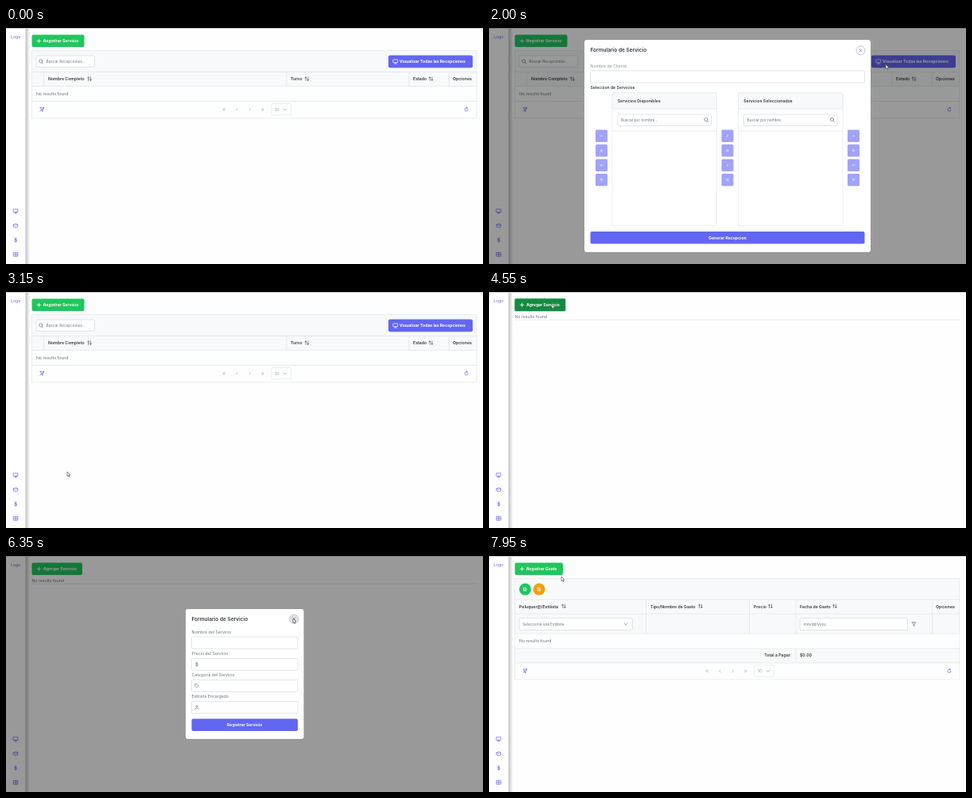
These frames come from a looping animation (600x298 px, 8 s). An HTML page:

```html
<!DOCTYPE html>
<html lang="es">
<head>
<meta charset="utf-8">
<style>
html, body { margin: 0; width: 100%; height: 100%; overflow: hidden; background: #fff; }
svg { display: block; width: 100%; height: 100%; font: 5.2px Inter, "Open Sans", sans-serif; }
</style>
</head>
<body>
<svg id="stage" viewBox="0 0 600 298"></svg>
<script>
const INDIGO = '#6366f1', GREEN = '#22c55e', GRAY = '#6c757d', DARK = '#343a40', LINE = '#e3e7eb', PALE = '#f8f9fa';

// Drawing helpers
const rect = (x, y, x2, y2, fill, stroke = 'none', r = 0, extra = '') =>
  `<rect x="${x}" y="${y}" width="${x2 - x}" height="${y2 - y}" rx="${r}" fill="${fill}" stroke="${stroke}" stroke-width=".7" ${extra}/>`;
const text = (x, y, s, fill = GRAY, weight = 400, size = 5.2, anchor = 'start') =>
  `<text x="${x}" y="${y}" fill="${fill}" font-weight="${weight}" font-size="${size}" text-anchor="${anchor}">${s}</text>`;
const bold = (x, y, s, size = 5.2) => text(x, y, s, DARK, 600, size);
const icon = (x, y, d, color = GRAY, w = .7) =>
  `<path transform="translate(${x} ${y})" d="${d}" fill="none" stroke="${color}" stroke-width="${w}" stroke-linecap="round" stroke-linejoin="round"/>`;
const line = (x, y, x2, y2) => `<path d="M${x} ${y}L${x2} ${y2}" stroke="${LINE}" stroke-width=".8"/>`;
const circle = (x, y, r, fill, extra = '') => `<circle cx="${x}" cy="${y}" r="${r}" fill="${fill}" ${extra}/>`;
const group = (id, body) => `<g id="${id}">${body}</g>`;
const input = (x, y, x2, y2) => rect(x, y, x2, y2, '#fff', '#d5dae0', 1.5);

const I = {
  plus: 'M-2.2 0H2.2M0-2.2V2.2',
  search: 'M1.4 1.4L2.7 2.7M1.8-.4A2.1 2.1 0 1 1-2.4-.4A2.1 2.1 0 1 1 1.8-.4',
  desktop: 'M-2.7-2.5H2.7V1.2H-2.7ZM0 1.2V2.6M-1.4 2.6H1.4',
  box: 'M-2.6-1.2L0-2.4L2.6-1.2V1.6L0 2.6L-2.6 1.6ZM-2.6-1.2L0 0L2.6-1.2',
  dollar: 'M1.5-1.3C1-2.1-1.5-2.1-1.5-.9C-1.5.3 1.6-.2 1.6 1.1C1.6 2.2-1.2 2.2-1.7 1.2M0-2.8V2.8',
  book: 'M-2.6-2.3H2.6V2.3H-2.6ZM0-2.3V2.3M-2.6 0H2.6',
  sort: 'M-1.4 2.2V-2.2L-2.5-1M-1.4-2.2L-.4-1M1.4-2.2V2.2L.4 1M1.4 2.2L2.5 1',
  funnel: 'M-2.3-2.3H2.3L.6 0V2.4L-.6 1.8V0Z',
  unfilter: 'M-2.3-2.3H2.3L.6 0V2.4L-.6 1.8V0ZM-2.6 2L2.4-2.6',
  refresh: 'M2.1 0A2.1 2.1 0 1 1 0-2.1H1.3M.3-3.1L1.4-2.1L.3-1.1',
  down: 'M-1.7-.8L0 .9L1.7-.8', up: 'M-1.2 .6L0-.6L1.2 .6',
  left: 'M.7-1.3L-.7 0L.7 1.3', right: 'M-.7-1.3L.7 0L-.7 1.3',
  lefts: 'M0-1.3L-1.4 0L0 1.3M1.6-1.3L.2 0L1.6 1.3', rights: 'M0-1.3L1.4 0L0 1.3M-1.6-1.3L-.2 0L-1.6 1.3',
  ups: 'M-1.2 0L0-1.2L1.2 0M-1.2 1.5L0 .3L1.2 1.5', downs: 'M-1.2 0L0 1.2L1.2 0M-1.2-1.5L0-.3L1.2-1.5',
  close: 'M-1.6-1.6L1.6 1.6M1.6-1.6L-1.6 1.6',
  tag: 'M-2.2-2.2H.2L2.4 0L0 2.4L-2.2 .2ZM-1-1V-.9',
  user: 'M1.2-1.2A1.2 1.2 0 1 1-1.2-1.2A1.2 1.2 0 1 1 1.2-1.2M-2.2 2.5C-2 .2 2 .2 2.2 2.5',
  file: 'M-1.4-2H.6L1.4-1.1V2H-1.4ZM-.6 0H.6M-.6 1H.6'
};

const addButton = (right, label, id) =>
  rect(32.5, 8.5, right, 24, GREEN, 'none', 2) +
  group(id, rect(32, 8, right + .5, 24.5, '#158a40', '#bbf7d0', 2)) +
  icon(41.5, 16.3, I.plus, '#fff', .8) + text(47, 18.2, label, '#fff', 700, 5.1);

const header = (x, y, s, arrow) => bold(x, y + 1.9, s) + (arrow ? icon(arrow, y - .4, I.sort, DARK, .6) : '');

const pager = y =>
  icon(45.5, y, I.unfilter, INDIGO) +
  [[274, I.lefts], [290.5, I.left], [307, I.right], [323, I.rights]].map(([x, d]) => icon(x, y, d, '#a3abb4')).join('') +
  rect(334, y - 7.5, 358.5, y + 7.3, '#fff', LINE, 1.5) + text(338, y + 1.9, '10', '#9aa2ab') +
  icon(351, y, I.down, '#8b949c') + icon(579, y, I.refresh, INDIGO);

const sidebar = rect(24, 0, 30, 298, 'url(#shade)') + rect(0, 0, 24.5, 298, '#fff') +
  group('nav1', rect(4, 240.5, 20, 258, '#f1f3f6', 'none', 2)) +
  group('nav2', rect(4, 259, 20, 276.5, '#f1f3f6', 'none', 2)) +
  text(12.2, 12.8, 'Logo', INDIGO, 400, 5.2, 'middle') +
  [I.desktop, I.box, I.dollar, I.book].map((d, i) => icon(12.2, 231.3 + i * 18.2, d, INDIGO)).join('') +
  rect(0, 0, 600, 1, '#cfd0d4');

const receptions = addButton(98.5, 'Registrar Servicio', 'hot1') +
  rect(32.5, 28.5, 592, 73.5, PALE) + rect(32.5, 28.5, 592, 114, 'none', LINE) +
  [55.5, 73.5, 92.5].map(y => line(32.5, y, 592, y)).join('') +
  [47.5, 353, 507, 557.5].map(x => line(x, 55.5, x, 73.5)).join('') +
  input(38, 35, 111.5, 49.3) + icon(44, 42.4, I.search) + text(50.5, 44, 'Buscar Recepciones...', GRAY, 400, 4.7) +
  rect(481, 34.5, 587, 50.3, INDIGO, 'none', 2) + icon(490, 42.4, I.desktop, '#fff') +
  text(495, 44.4, 'Visualizar Todas las Recepciones', '#fff', 700, 5.1) +
  header(53, 64.5, 'Nombre Completo', 105) + header(358, 64.5, 'Turno', 378.5) +
  header(512, 64.5, 'Estado', 534.5) + header(562, 64.5, 'Opciones') +
  text(38, 84.8, 'No results found') + pager(103);

const services = addButton(96, 'Agregar Servicio', 'hot2') +
  text(32.5, 32.6, 'No results found') + line(32.5, 35, 592, 35);

const expenses = addButton(93, 'Registrar Gasto', 'hot3') +
  rect(32.5, 28.5, 592, 98, PALE) + rect(32.5, 117, 592, 135, PALE) + rect(32.5, 28.5, 592, 156, 'none', LINE) +
  [55, 73, 98, 117, 135].map(y => line(32.5, y, 592, y)).join('') +
  [197.5, 327.5, 386, 557.5].map(x => line(x, 55, x, 98)).join('') + line(386, 117, 386, 135) +
  circle(45.5, 42, 7.5, GREEN) + icon(45.5, 42, I.file, '#fff') +
  circle(63, 42, 7.5, '#f59e0b') + icon(63, 42, I.file, '#fff') +
  header(38, 63.7, 'Peluquer@/Estilista', 94) + header(203, 63.7, 'Tipo/Nombre de Gasto', 266) +
  header(333, 63.7, 'Precio', 354) + header(391, 63.7, 'Fecha de Gasto', 435) + header(562, 63.7, 'Opciones') +
  input(38, 78.3, 180.5, 93.5) + text(42, 87.7, 'Selecciona una Estilista', GRAY, 400, 4.7) + icon(172, 86, I.down) +
  input(391, 78.3, 526.5, 93.5) + text(395.5, 87.7, 'mm/dd/yyyy', GRAY, 400, 4.8) + icon(534.5, 86, I.funnel) +
  text(38, 109.3, 'No results found') +
  text(380.5, 127.4, 'Total a Pagar:', DARK, 600, 5.2, 'end') + bold(391, 127.4, '$0.00') + pager(145.3);

const wideButton = (x, y, x2, label) => rect(x, y, x2, y + 15.5, INDIGO, 'none', 2) +
  text((x + x2) / 2, y + 9.7, label, '#fff', 700, 5.1, 'middle');

const panel = (x, title) => rect(x, 82, x + 131.5, 250, '#fff', LINE, 1.5) +
  rect(x, 82, x + 131.5, 102, PALE, LINE, 1.5) + bold(x + 6.7, 93.9, title) +
  input(x + 7, 109, x + 124.5, 123.5) + text(x + 11, 118, 'Buscar por nombre...', GRAY, 400, 4.7) +
  icon(x + 118.3, 116, I.search) + line(x, 130, x + 131.5, 130);

const controls = (x, icons) => icons.map((d, i) => {
  const y = 128.5 + i * 18.5;
  return rect(x, y, x + 15, y + 15.5, '#a1a3f7', 'none', 1.5) + icon(x + 7.5, y + 7.7, d, '#fff');
}).join('');
const order = [I.up, I.ups, I.down, I.downs];

const receptionForm = rect(120, 15, 480, 283, '#fff', 'none', 3) +
  bold(127.5, 30.4, 'Formulario de Servicio', 6.5) +
  group('ring1', circle(467.5, 28.3, 5.5, '#fff', 'stroke="#b9bbf9" stroke-width="1"')) + icon(467.5, 28.3, I.close) +
  text(127.5, 49.5, 'Nombre de Cliente', '#8a929a') + input(127.5, 54, 472.5, 69) +
  bold(127.5, 77, 'Seleccion de Servicios', 5.1) +
  panel(155, 'Servicios Disponibles') + panel(313.5, 'Servicios Seleccionados') +
  controls(134, order) + controls(292.5, [I.right, I.rights, I.left, I.lefts]) + controls(451, order) +
  wideButton(127.5, 257, 472.5, 'Generar Recepcion');

const serviceForm = rect(226, 67, 374.5, 231, '#fff', 'none', 3) +
  bold(233.5, 81.7, 'Formulario de Servicio', 6.5) +
  group('ring2', circle(362.3, 79.5, 5.7, '#dfe2e8', 'stroke="#b5b8c0" stroke-width=".6"')) + icon(362.3, 79.5, I.close) +
  ['Nombre del Servicio', 'Precio del Servicio', 'Categoria del Servicio', 'Estilista Encargado'].map((s, i) => {
    const y = 102 + i * 27.2;
    return text(233.5, y - 4.3, s) + input(233.5, y, 367, y + 15) +
      (i ? icon(240, y + 7.5, [0, I.dollar, I.tag, I.user][i], GRAY, .6) : '');
  }).join('') + wideButton(233.5, 205.5, 367, 'Registrar Servicio');

const stage = document.getElementById('stage');
stage.innerHTML =
  '<defs><linearGradient id="shade"><stop stop-color="#b9babd"/><stop offset="1" stop-color="#fff"/></linearGradient></defs>' +
  rect(0, 0, 600, 298, '#fefefe') + sidebar +
  group('page1', receptions) + group('page2', services) + group('page3', expenses) +
  group('mask', rect(0, 0, 600, 298, '#000')) +
  group('form1', receptionForm) + group('form2', serviceForm) +
  group('cursor', '<path d="M0 0V5.6L1.3 4.4L2.2 6.4L3 6L2.1 4.1L3.9 4Z" fill="#fff" stroke="#444" stroke-width=".6"/>');

// Timing
const clamp = v => Math.min(1, Math.max(0, v));
const bezier = (x1, y1, x2, y2) => p => {
  if (p <= 0 || p >= 1) return clamp(p);
  const at = (a, b, s) => 3 * a * s * (1 - s) ** 2 + 3 * b * s * s * (1 - s) + s ** 3;
  let lo = 0, hi = 1;
  for (let i = 0; i < 20; i++) {
    const mid = (lo + hi) / 2;
    if (at(x1, x2, mid) < p) lo = mid; else hi = mid;
  }
  return at(y1, y2, lo);
};
const ease = bezier(.25, .1, .25, 1), enter = bezier(0, 0, .2, 1), leave = bezier(.4, 0, .2, 1);
const span = (t, from, to, inn, out, ms = 150) => t < to ? inn((t - from) / ms) : 1 - out((t - to) / ms);

const path = [
  [250, 96, 17], [700, 62, 14.5], [1350, 62, 14.5], [1950, 500, 51], [2000, 499, 46], [2450, 466, 26.5], [2600, 466, 26.5],
  [3150, 77, 227], [3450, 12, 248], [3700, 12, 248], [4400, 79, 15.5], [5120, 79, 15.5], [5700, 379, 86], [5950, 361, 79],
  [6480, 361, 79], [7020, 12, 267], [7280, 12, 267], [7700, 131, 66], [7950, 91, 26], [8000, 91, 26]
];
const pointer = t => {
  const i = Math.max(1, path.findIndex(k => k[0] > t));
  const [t0, x0, y0] = path[i - 1], [t1, x1, y1] = path[i];
  const p = clamp((t - t0) / (t1 - t0)), e = p * p * (3 - 2 * p);
  return [x0 + (x1 - x0) * e, y0 + (y1 - y0) * e];
};

const fade = (id, v) => document.getElementById(id).setAttribute('opacity', v);
const form = (id, v) => {
  fade(id, v);
  document.getElementById(id).setAttribute('transform', `translate(300 149) scale(${.7 + .3 * v}) translate(-300 -149)`);
};

function draw(now) {
  const t = now % 8000;
  fade('page1', +(t < 3650));
  fade('page2', +(t >= 3650 && t < 7250));
  fade('page3', +(t >= 7250));
  fade('hot1', span(t, 250, 1400, ease, ease, 200));
  fade('hot2', span(t, 4330, 5180, ease, ease, 200));
  fade('hot3', 0);
  fade('nav1', span(t, 3400, 3780, ease, ease));
  fade('nav2', span(t, 6960, 7330, ease, ease));
  fade('ring1', +(t > 1375));
  fade('ring2', span(t, 5850, 6500, ease, ease));
  form('form1', span(t, 1225, 2575, enter, leave));
  form('form2', span(t, 4885, 6450, enter, leave));
  fade('mask', .4 * Math.max(span(t, 1225, 2575, ease, ease), span(t, 4885, 6450, ease, ease)));
  fade('cursor', +(t >= 250));
  document.getElementById('cursor').setAttribute('transform', `translate(${pointer(t)})`);
  requestAnimationFrame(() => draw(performance.now()));
}
draw(0);
</script>
</body>
</html>
```
